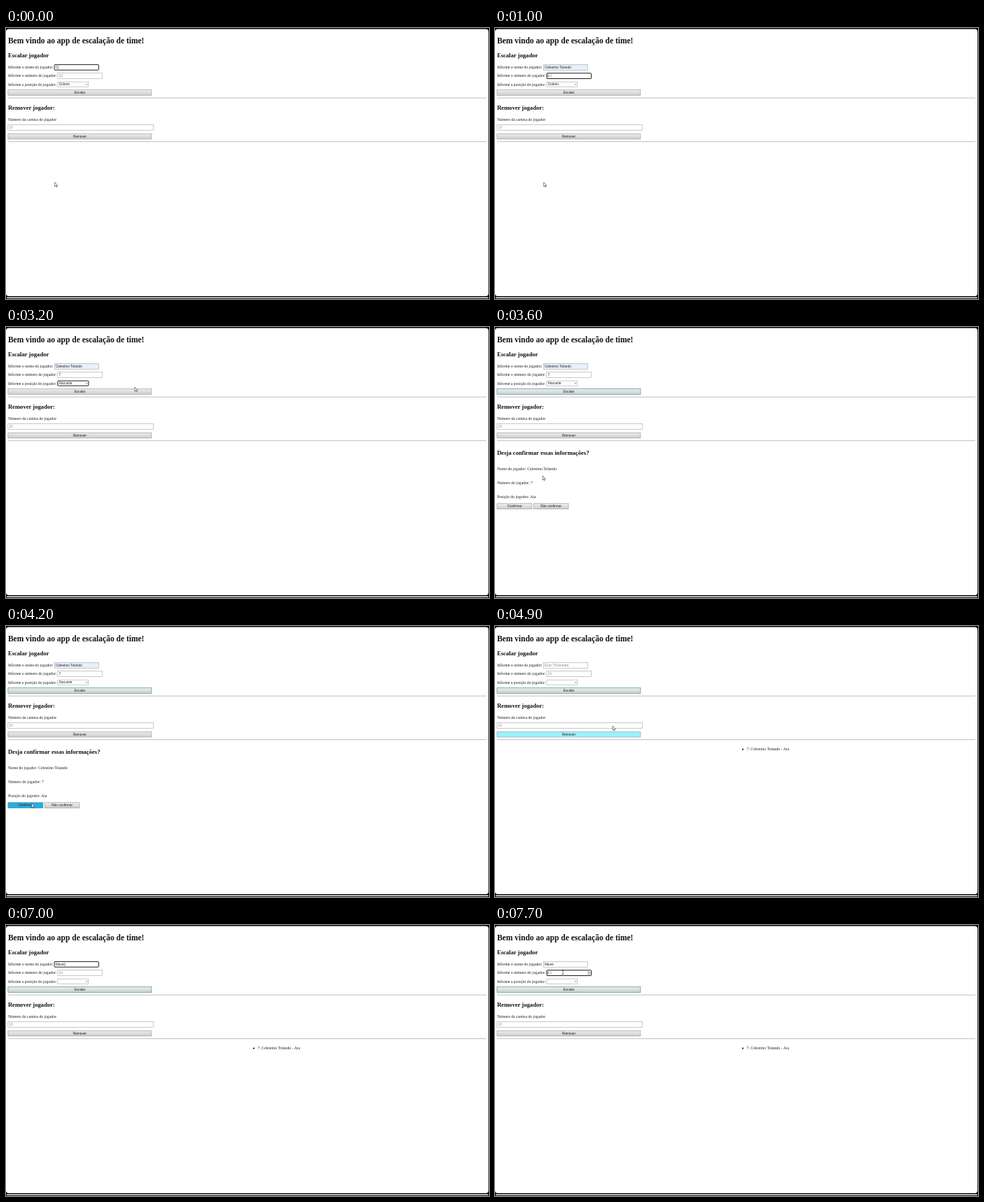
Animation, 690 px wide and 388 px high, one loop 8000 ms. Source, as an HTML page:

```html
<!DOCTYPE html>
<html lang="pt">
<head>
<meta charset="utf-8">
<title>Escalação de time</title>
<style>
  html, body { margin: 0; width: 100%; height: 100%; overflow: hidden; background: #000; }
  svg { display: block; width: 100%; height: 100%; }
  text { font: 5.75px "Liberation Serif", "Times New Roman", serif; fill: #222; white-space: pre; }
  .h1 { font-size: 11.5px; font-weight: bold; fill: #111; }
  .h2 { font-size: 8.625px; font-weight: bold; fill: #111; }
  .ui { font: 4.79px "Liberation Sans", Arial, sans-serif; }
  .hint { fill: #858585; }
  .mid { text-anchor: middle; }
</style>
</head>
<body>
<svg viewBox="0 0 690 388">
  <defs>
    <linearGradient id="face" x2="0" y2="1">
      <stop stop-color="#ededed"/><stop offset="1" stop-color="#cdcdcd"/>
    </linearGradient>
  </defs>
  <rect width="690" height="388"/>
  <rect y="1.5" width="689.3" height="382.5" rx="4" fill="#fff"/>
  <rect x="1" y="385.5" width="688" height="1.5" fill="#fff"/>
  <g id="page"></g>
</svg>
<script>
const LOOP = 8000, STEP = 100;
const PLAYER = 'Celestino Tolando', NEXT = 'Mavei', EXAMPLE = 'Evan Trilstombe';
const LEFT = 2.9, ROW = 12.3, HEIGHT = 7.8;
const page = document.getElementById('page');

// Moments of the interaction, in ms
const AUTOFILL = 600, TAB_NUMBER = 1000, TYPE_NUMBER = 1600, TAB_SELECT = 2000, PICK = 2200;
const CLICK_ADD = 3300, CLICK_YES = 4200, LISTED = 4300;
const CLICK_NAME = 5400, TYPE_NAME = 6000, LAST_LETTER = 7000, LEAVE_NAME = 7200, CLICK_NUMBER = 7600;

// Turning points of the pointer: time, x, y
const path = [
  [2500, 69.6, 221], [2600, 77, 218], [2800, 222, 100], [3000, 196, 79], [3100, 196, 79],
  [CLICK_ADD, 172, 93], [3600, 68, 213], [4000, 36.5, 254], [4400, 36.5, 254],
  [4800, 193, 154], [4900, 168, 143], [5300, 102.5, 57.5], [LEAVE_NAME, 102.5, 57.5], [7400, 97, 67.8]
];

function pointerAt(t) {
  const next = path.findIndex(p => p[0] > t);
  if (next < 1) return path.at(next).slice(1);
  const [t0, x0, y0] = path[next - 1], [t1, x1, y1] = path[next];
  const k = (t - t0) / (t1 - t0);
  return [x0 + (x1 - x0) * k, y0 + (y1 - y0) * k];
}

const within = (t, start, end) => t >= start && t < end;

function nameAt(t) {
  if (t < AUTOFILL) return PLAYER[0];
  if (t < LISTED) return PLAYER;
  const letters = t < LAST_LETTER ? Math.min(NEXT.length - 1, (t - TYPE_NAME) / 100) : NEXT.length;
  return NEXT.slice(0, Math.max(0, letters));
}

function focusAt(t) {
  if (t < TAB_NUMBER || within(t, CLICK_NAME, 7400)) return 'name';
  if (t < TAB_SELECT || t >= CLICK_NUMBER) return 'number';
  return t < CLICK_ADD ? 'select' : '';
}

const text = (x, y, s, cls = '') => `<text x="${x}" y="${y}" class="${cls}">${s}</text>`;
const box = (x, y, w, h, fill, stroke, weight = .5, r = 0) =>
  `<rect x="${x}" y="${y}" width="${w}" height="${h}" rx="${r}" fill="${fill}" stroke="${stroke}" stroke-width="${weight}"/>`;
const line = (d, color, weight) => `<path d="${d}" fill="none" stroke="${color}" stroke-width="${weight}"/>`;
const rule = y => line(`M${LEFT} ${y}H686`, '#a4a4a4', .7);
const frame = (x, y, w, h, focused, fill = '#fff') =>
  focused ? box(x, y, w, h, fill, '#111', .95, .7) : box(x, y, w, h, fill, '#858585', .45);

function field(x, y, w, value, hint, focused, fill) {
  const caret = focused && value ? '<tspan dx="-.2">|</tspan>' : '';
  return frame(x, y, w, HEIGHT, focused, fill) +
    text(x + 1.7, y + 5.6, (value || hint) + caret, value ? 'ui' : 'ui hint') +
    (focused && !value ? line(`M${x + 1.6} ${y + 1.5}v4.8`, '#222', .5) : '');
}

// Hover colours trail the pointer by one step
function button(t, x, y, w, label, clickTime) {
  const [px, py] = pointerAt(t - STEP);
  const hovered = within(px, x, x + w) && within(py, y, y + HEIGHT);
  const fill = within(t, clickTime, clickTime + STEP) ? '#2aace2' : hovered ? '#9bf1fd' : 'url(#face)';
  const [edge, weight] = t >= clickTime ? ['#3f8d98', .65] : ['#858585', .5];
  return box(x, y, w, HEIGHT, fill, edge, weight) + text(x + w / 2, y + 5.6, label, 'ui mid');
}

function form(t) {
  const focus = focusAt(t);
  const number = within(t, TYPE_NUMBER, LISTED) ? '7' : '';
  const position = t < PICK ? 'Goleiro' : t < LISTED ? 'Atacante' : '';
  const nameFill = within(t, AUTOFILL, LISTED) ? '#e8f0fe' : '#fff';
  const labels = ['nome', 'número', 'posição'].map((word, i) =>
    text(LEFT, 58 + ROW * i, `Informe ${i < 2 ? 'o' : 'a'} ${word} do jogador:`)).join('');
  const spinner = t < CLICK_NUMBER ? '' : box(132, 65.8, 4.3, 5.8, '#ddd', 'none') +
    line('M133.2 68l1-1.2 1 1.2M133.2 69.5l1 1.2 1-1.2', '#555', .6);

  return text(LEFT, 21.7, 'Bem vindo ao app de escalação de time!', 'h1') +
    text(LEFT, 41.5, 'Escalar jogador', 'h2') + labels +
    field(69.2, 52.4, 63.2, nameAt(t), EXAMPLE, focus === 'name', nameFill) +
    field(73.9, 52.4 + ROW, 63.6, number, '10', focus === 'number') + spinner +
    frame(73.9, 77.1, 44, 7, focus === 'select') +
    text(75.6, 82.3, position, 'ui') +
    line('M113.8 80l1.3 1.3 1.3-1.3', '#333', .6) +
    button(t, LEFT, 88.6, 205, 'Escalar', CLICK_ADD) +
    rule(100.2) +
    text(LEFT, 116.8, 'Remover jogador:', 'h2') +
    text(LEFT, 133, 'Número da camisa do jogador') +
    field(LEFT, 138.7, 207.8, '', '10', false) +
    button(t, LEFT, 151.2, 205, 'Remover') +
    rule(162.7);
}

function confirmation(t) {
  const facts = [`Nome do jogador: ${PLAYER}`, 'Número do jogador: 7', 'Posição do jogodor: Ata'];
  return text(LEFT, 183, 'Desja confirmar essas informações?', 'h2') +
    facts.map((fact, i) => text(LEFT, 204.7 + 20 * i, fact)).join('') +
    button(t, LEFT, 252.8, 50, 'Confirmar', CLICK_YES) +
    button(t, 55.2, 252.8, 49.8, 'Não confirmar');
}

const team = () =>
  '<circle cx="354" cy="176.6" r="1.1" fill="#111"/>' + text(359.6, 178.1, `7. ${PLAYER} - Ata`);

function cursor(t) {
  if (within(t, TYPE_NAME, LEAVE_NAME)) return '';
  const shape = t < 5300
    ? '<path d="M0 0V6L1.4 4.8 2.3 7 3.3 6.6 2.4 4.5H4.3Z" fill="#fff" stroke="#222" stroke-width=".55"/>'
    : line('M-1.2 -2.8H1.2M0 -2.8V2.8M-1.2 2.8H1.2', '#222', .6);
  return `<g transform="translate(${pointerAt(t)})">${shape}</g>`;
}

let shown = -1;
function draw(now) {
  const t = Math.floor(now % LOOP / STEP) * STEP;
  if (t !== shown) {
    shown = t;
    const panel = t >= LISTED ? team() : t > CLICK_ADD ? confirmation(t) : '';
    page.innerHTML = form(t) + panel + cursor(t);
  }
  requestAnimationFrame(draw);
}
draw(performance.now());
</script>
</body>
</html>
```
